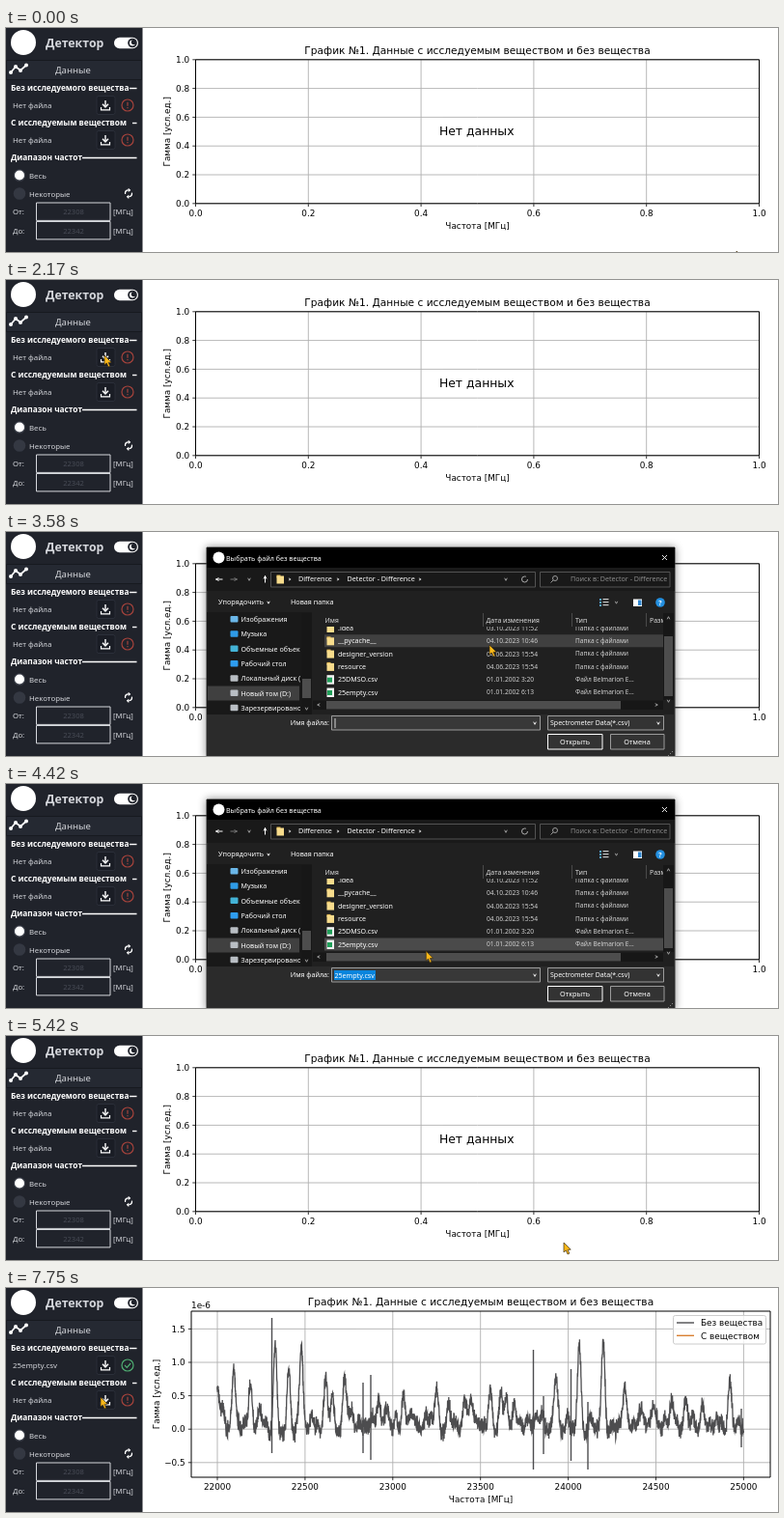
Recreate the animation shown at these times as an HTML page with a canvas. Size 800 px wide and 232 px high, loop 8000 ms.

```html
<!DOCTYPE html>
<html lang="ru">
<head>
<meta charset="utf-8">
<title>Детектор</title>
<style>
html, body { margin: 0; width: 100%; height: 100%; overflow: hidden; background: #fff; }
canvas { display: block; width: 800px; height: 232px; }
</style>
</head>
<body>
<canvas id="stage"></canvas>
<script>
const LOOP = 8000, FRAME = 1000 / 12;
const ratio = window.devicePixelRatio || 1;
const canvas = document.getElementById('stage');
const layer = document.createElement('canvas');
canvas.width = layer.width = 800 * ratio;
canvas.height = 232 * ratio;
layer.height = 242 * ratio;
const stage = canvas.getContext('2d'), layerContext = layer.getContext('2d');
let ctx = stage; // the context that the drawing helpers use

const PLOT = '"DejaVu Sans", sans-serif';
const UI = '"Noto Sans", "Open Sans", sans-serif';

// y is the vertical middle of the capitals
function text(s, x, y, size, color, { align = 'left', font = UI, weight = 400 } = {}) {
  ctx.font = `${weight} ${size}px ${font}`;
  ctx.textAlign = align;
  ctx.fillStyle = color;
  ctx.fillText(s, x, y + size * 0.365);
}
function box(x, y, w, h, fill, stroke, radius = 0) {
  ctx.beginPath();
  ctx.roundRect(x, y, w, h, radius);
  if (fill) { ctx.fillStyle = fill; ctx.fill(); }
  if (stroke) { ctx.strokeStyle = stroke; ctx.lineWidth = 1; ctx.stroke(); }
}
function line(points, color, width = 1) {
  ctx.beginPath();
  points.forEach(([x, y]) => ctx.lineTo(x, y));
  ctx.strokeStyle = color;
  ctx.lineWidth = width;
  ctx.stroke();
}
function disc(x, y, r, fill, stroke, width = 1) {
  ctx.beginPath();
  ctx.arc(x, y, r, 0, 7);
  if (fill) { ctx.fillStyle = fill; ctx.fill(); }
  if (stroke) { ctx.strokeStyle = stroke; ctx.lineWidth = width; ctx.stroke(); }
}
function clipped(x, y, w, h, draw) {
  ctx.save();
  ctx.beginPath();
  ctx.rect(x, y, w, h);
  ctx.clip();
  draw();
  ctx.restore();
}
function chevron(x, y, dx, dy, color = '#aaa') {
  line([[x - dx - dy, y - dy - dx], [x + dx, y + dy], [x - dx + dy, y - dy + dx]], color, 0.9);
}

// ---------- plot ----------
const emptyAxes = {
  x0: 196.5, x1: 780.5, y0: 32.8, y1: 181.8, labelX: 167, title: 23.5,
  xs: [0, 1, 2, 3, 4, 5].map(i => [196.5 + i * 116.8, (i / 5).toFixed(1)]),
  ys: [0, 1, 2, 3, 4, 5].map(i => [181.8 - i * 29.8, (i / 5).toFixed(1)])
};
const dataAxes = {
  x0: 192, x1: 792, y0: 24, y1: 196, labelX: 155.5, title: 14.2,
  xs: [0, 1, 2, 3, 4, 5, 6].map(i => [219 + i * 90.9, String(22000 + i * 500)]),
  ys: [-1, 0, 1, 2, 3].map(i => [146.2 - i * 34.6, (i / 2).toFixed(1).replace('-', '\u2212')])
};

const peaks = [[219, 103], [225, 120], [236, 79], [253, 101], [264, 130], [279, 70], [293, 96], [306, 59],
  [331, 97], [338, 113], [351, 101], [358, 122], [386, 117], [396, 129], [412, 123], [421, 129],
  [446, 113], [459, 130], [476, 117], [482, 126], [502, 105], [513, 109], [519, 119], [527, 126],
  [570, 94], [594, 57], [619, 64], [641, 102], [660, 127], [671, 121], [690, 116], [705, 127], [722, 131], [750, 104]];
const spikes = [[275.5, 31, 171], [370, 98, 171], [378, 90, 178], [546.5, 64, 188], [557, 112, 172],
  [585.5, 84, 179], [603, 118, 188], [762, 125, 165]];

let seed = 11;
const random = () => (seed = seed * 16807 % 2147483647) / 2147483647;
const minor = Array.from({ length: 70 }, (_, i) => [222 + i * 7.75 + random() * 4, 140 - 14 * random()]);
const spectrum = [];
for (let x = 218.8; x <= 764.5; x += 0.2) {
  let y = 144;
  for (const [px, top] of [...peaks, ...minor]) {
    const u = (x - px) / 1.9;
    if (Math.abs(u) < 12) y -= (144 - top) * (1.12 * Math.exp(-u * u / 2) - 0.16 * Math.exp(-u * u / 14));
  }
  spectrum.push([x, y + (random() + random() - 1) * 11]);
}

function plot(a) {
  const cx = (a.x0 + a.x1) / 2, cy = (a.y0 + a.y1) / 2;
  const opt = align => ({ align, font: PLOT });
  for (const [x, label] of a.xs) {
    line([[x, a.y0], [x, a.y1]], '#b0b0b0', 0.9);
    line([[x, a.y1], [x, a.y1 + 3.2]], '#000', 0.8);
    text(label, x, a.y1 + 9.8, 8.87, '#000', opt('center'));
  }
  for (const [y, label] of a.ys) {
    line([[a.x0, y], [a.x1, y]], '#b0b0b0', 0.9);
    line([[a.x0 - 3.2, y], [a.x0, y]], '#000', 0.8);
    text(label, a.x0 - 6.3, y, 8.87, '#000', opt('right'));
  }
  text('График №1. Данные с исследуемым веществом и без вещества', cx, a.title, 10.64, '#000', opt('center'));
  text('Частота [МГц]', cx, a.y1 + 22.7, 8.87, '#000', opt('center'));
  ctx.save();
  ctx.translate(a.labelX, cy);
  ctx.rotate(-Math.PI / 2);
  text('Гамма [усл.ед.]', 0, 0, 8.87, '#000', opt('center'));
  ctx.restore();

  if (a === emptyAxes) {
    text('Нет данных', cx - 0.8, cy - 0.5, 12.4, '#000', opt('center'));
  } else {
    text('1e-6', a.x0, 18, 8.87, '#000', opt('left'));
    line(spectrum, '#4d4d4f', 1.3);
    spikes.forEach(([x, top, bottom]) => line([[x, top], [x, bottom]], '#4d4d4f', 1.4));
  }
  box(a.x0, a.y0, a.x1 - a.x0, a.y1 - a.y0, null, '#000');
  if (a === dataAxes) {
    box(691.5, 28.5, 96, 29.5, 'rgba(255,255,255,.8)', '#ccc', 2);
    [['Без вещества', '#4d4d4f', 36], ['С веществом', '#d98032', 49.3]].forEach(([s, color, y]) => {
      line([[695, y], [713, y]], color, 1.4);
      text(s, 720, y, 8.87, '#000', opt('left'));
    });
  }
}

// ---------- side panel ----------
function fileRow(y, name, loaded) {
  text(name, 7, y + 0.5, 7.9, '#d5d7dc');
  box(94, y - 9.5, 19, 19, '#1a1d25', '#2b2f39', 2);
  line([[103, y - 5], [103, y + 1.5]], '#fff', 1.4);
  line([[100, y - 1.2], [103, y + 2], [106, y - 1.2]], '#fff', 1.4);
  line([[98.5, y + 2], [98.5, y + 4.8], [107.5, y + 4.8], [107.5, y + 2]], '#fff', 1.2);
  disc(126, y, 6, null, loaded ? '#4fae72' : '#a5433c', 1.2);
  if (loaded) {
    line([[123, y], [125.3, y + 2.3], [129.2, y - 2]], '#4fae72', 1.2);
  } else {
    line([[126, y - 3.2], [126, y + 0.8]], '#a5433c', 1.2);
    line([[126, y + 2], [126, y + 3.2]], '#a5433c', 1.2);
  }
}
function section(y, title, lineX) {
  text(title, 5, y - 0.3, 8.3, '#fff', { weight: 700 });
  line([[lineX, y], [135.5, y]], '#fff', 1.4);
}
function panel(loaded) {
  box(0, 0, 141.5, 232, '#20232b');
  disc(18, 15, 13, '#fff');
  text('Детектор', 41, 16, 12.3, '#d5d7dc', { weight: 700 });
  box(112, 9.8, 25, 11.4, '#fff', null, 5.7);
  disc(131, 15.5, 4.8, '#20232b');
  disc(131, 15.5, 3, '#fff');
  disc(132.4, 14.6, 2.6, '#20232b');

  box(0.5, 33.5, 140, 20, '#252932', '#17191f');
  const trend = [[5, 46], [10, 40], [15, 44], [21, 38.5]];
  line(trend, '#fff', 1.7);
  trend.forEach(([x, y]) => disc(x, y, 2, '#fff'));
  text('Данные', 51, 43.5, 9.5, '#d5d7dc');

  section(62.5, 'Без исследуемого вещества', 128);
  fileRow(80, loaded ? '25empty.csv' : 'Нет файла', loaded);
  section(98.5, 'С исследуемым веществом', 131);
  fileRow(116, 'Нет файла', false);
  section(134.5, 'Диапазон частот', 79);

  disc(14, 152.5, 6.3, '#3a3e48');
  disc(14, 152.5, 5, '#fff');
  text('Весь', 24, 152.7, 7.8, '#d5d7dc');
  disc(14, 171.5, 6.3, '#343842');
  text('Некоторые', 24, 171.7, 7.8, '#d5d7dc');
  [0, Math.PI].forEach(turn => {
    ctx.save();
    ctx.translate(127, 171.3);
    ctx.rotate(turn);
    ctx.beginPath();
    ctx.arc(0, 0, 3.5, -0.2, 2);
    ctx.strokeStyle = '#fff';
    ctx.lineWidth = 1.2;
    ctx.stroke();
    line([[0.3, 2], [-1.4, 3.4], [0.3, 5]], '#fff', 1.1);
    ctx.restore();
  });
  [['От:', '22308', 190.3], ['До:', '22342', 209.8]].forEach(([label, value, y]) => {
    text(label, 7, y, 7.8, '#d5d7dc');
    box(31.5, y - 9.3, 76.5, 18.4, '#20232b', '#d5d7dc');
    text(value, 70, y + 0.3, 7.6, '#484c56', { align: 'center' });
    text('[МГц]', 111, y, 7.8, '#d5d7dc');
  });
}

// ---------- file dialog ----------
function titleBar(closing) {
  const title = 'Выбрать файл без вещества';
  if (closing) {
    text(title, 210, 27, 7.1, '#fff');
    return;
  }
  box(208, 16, 485, 21, '#000');
  disc(220.5, 26.5, 6, '#fff');
  text(title, 228, 27, 7.1, '#fff');
  line([[680, 24], [685, 29]], '#fff', 0.9);
  line([[685, 24], [680, 29]], '#fff', 0.9);
}
function horizontalBar() {
  box(318, 174.5, 363, 9.5, '#171717');
  box(332, 175, 305, 8.5, '#4d4d4d');
  chevron(324, 179, -1.3, 0);
  chevron(674, 179, 1.3, 0);
}
function page(x, y) {
  box(x - 3.5, y - 4.5, 7.5, 9.5, '#f2f2f2');
}
function blankDialog() {
  box(208, 16, 485, 217.5, '#fff');
  titleBar();
  box(208, 83, 109, 101, '#191919');
  text('Быстрый доступ', 238, 101, 7.1, '#fff');
  clipped(208, 83, 100, 100.5, () => {
    ['Этот компьютер', '1)download', 'Рабочий стол', 'Локальный диск', 'university'].forEach((s, i) => {
      const y = 116.5 + i * 15.3;
      page(235, y);
      clipped(243, 84, 53, 100, () => text(s, 243.5, y, 7.1, '#fff'));
      line([[298.5, y + 3], [303.5, y - 2]], '#aaa', 1.2);
      line([[299.5, y - 1], [302.5, y + 2]], '#aaa', 1);
    });
  });
  box(306.5, 94, 10, 25, '#4d4d4d');
  chevron(311.5, 89, 0, -1.3);
  box(681, 83, 12, 90, '#171717');
  box(682, 94, 9, 50, '#4d4d4d');
  chevron(686.5, 89, 0, -1.3);
  chevron(686.5, 168, 0, 1.3);
  horizontalBar();
  box(208, 184, 485, 49.5, '#434343');
  [[293, 193, 41, 9], [337, 190, 216, 15], [561, 190, 120, 15], [561, 209, 56, 16], [625, 209, 56, 16]]
    .forEach(r => box(...r, '#fff'));
}

const places = [['Изображения', '#6bb7e8'], ['Музыка', '#2f9be6'], ['Объемные объекты', '#43b3d6'],
  ['Рабочий стол', '#2e9df0'], ['Локальный диск (C:)', '#b9bec4'], ['Новый том (D:)', '#b9bec4'],
  ['Зарезервировано', '#b9bec4']];
const FOLDER = 'Папка с файлами', SHEET = 'Файл Belmarion E...';
const files = [['.idea', '03.10.2023 11:52', FOLDER], ['__pycache__', '04.10.2023 10:46', FOLDER],
  ['designer_version', '04.06.2023 15:54', FOLDER], ['resource', '04.06.2023 15:54', FOLDER],
  ['25DMSO.csv', '01.01.2002 3:20', SHEET], ['25empty.csv', '01.01.2002 6:13', SHEET]];

function folder(x, y) {
  box(x - 3.5, y - 4.5, 4, 3, '#e0b650');
  box(x - 3.5, y - 3.5, 7.5, 8, '#f7dc8c');
}
function addressRow() {
  box(208, 37, 485, 24, '#191919');
  [[221, -1, 0, '#fff'], [236, 1, 0, '#777'], [268.5, 0, -1, '#fff']].forEach(([x, dx, dy, color]) => {
    line([[x - dx * 3.5, 49 - dy * 3.5], [x + dx * 3.5, 49 + dy * 3.5]], color);
    chevron(x + dx * 2, 49 + dy * 2, dx * 1.5, dy * 1.5, color);
  });
  chevron(252, 49, 0, 1.3);
  box(274.5, 41.5, 274, 15.5, '#191919', '#535353');
  folder(284, 49);
  [294, 344, 429].forEach(x => chevron(x, 49, 1.1, 0, '#ddd'));
  text('Difference', 303, 48.5, 7.2, '#fff');
  text('Detector - Difference', 353.5, 48.5, 7.2, '#fff');
  chevron(518, 49, 0, 1.3);
  ctx.beginPath();
  ctx.arc(537.5, 49, 3, 0, 5.2);
  ctx.strokeStyle = '#bbb';
  ctx.stroke();
  box(553.5, 41.5, 134.5, 15.5, '#191919', '#535353');
  disc(569, 48, 2.5, null, '#999');
  line([[567, 50], [564.5, 52.5]], '#999');
  clipped(554, 42, 133, 15, () => text('Поиск в: Detector - Difference', 585, 48.5, 7.1, '#8c8c8c'));
}
function toolbar() {
  text('Упорядочить', 220, 72.7, 7.2, '#fff');
  chevron(272, 73, 0, 1.2, '#fff');
  text('Новая папка', 295, 72.7, 7.2, '#fff');
  for (let i = 0; i < 3; i++) {
    box(615, 69 + i * 3, 2, 2, '#58a6dc');
    box(618.5, 69 + i * 3, 6, 1.2, '#ccc');
  }
  chevron(632.5, 73, 0, 1.2);
  box(650, 69.5, 9, 7.5, '#fff');
  box(655, 70.5, 3.5, 5.5, '#2f86cf');
  disc(678, 73, 4.8, '#2490e0');
  text('?', 678, 73, 7, '#fff', { align: 'center', weight: 700 });
}
function navigation() {
  box(208, 83, 109, 106, '#191919');
  clipped(208, 83, 97, 106, () => places.forEach(([name, color], i) => {
    const y = 90.5 + i * 15.3;
    if (i === 5) box(209, y - 7.5, 95, 15, '#404040');
    box(232.5, y - 3.5, 8, 6.5, color, null, 1);
    text(name, 243.5, y, 7.1, '#fff');
  }));
  box(306.5, 84, 10, 105, '#171717');
  box(307, 152, 9, 20, '#4d4d4d');
  chevron(311.5, 183, 0, 1.3);
}
function fileList(scroll, hovered, selected) {
  clipped(318, 98, 363, 76, () => files.forEach(([name, date, type], i) => {
    const y = 99.5 + i * 13.3 + 7 * (1 - scroll);
    if (i === selected || i === hovered) box(330, y - 6.5, 351, 13, i === selected ? '#4a4a4a' : '#404040');
    if (type === FOLDER) {
      folder(336, y);
    } else {
      page(336, y);
      box(333, y - 2, 5, 5, '#21a05a');
    }
    text(name, 344, y, 7.1, '#fff');
    text(date, 498, y, 6.7, '#d0d0d0');
    text(type, 590, y, 6.5, '#d0d0d0');
  }));
  clipped(318, 84, 363, 14, () => {
    [['Имя', 330.5], ['Дата изменения', 497.5], ['Тип', 590], ['Размер', 667]]
      .forEach(([s, x]) => text(s, x, 91, 6.9, '#ddd'));
    [494.5, 586.5, 663.5].forEach(x => line([[x, 84], [x, 98]], '#4a4a4a'));
  });
  box(681, 84, 11, 90, '#171717');
  box(682, 100 + 8 * scroll, 9, 62, '#4d4d4d');
  chevron(686.5, 89, 0, -1.3);
  chevron(686.5, 175, 0, 1.3);
  horizontalBar();
}
function fileDialog(k, [mx, my]) {
  const picked = k >= 50;
  box(208, 16, 485, 217.5, '#202020', '#3a3a3a');
  titleBar(k > 60);
  addressRow();
  toolbar();
  navigation();
  const inList = mx > 330 && mx < 681 && my > 98 && my < 173;
  fileList(k >= 41 ? 1 : 0, inList ? Math.round((my - 101) / 13.3) : -1, picked ? 5 : -1);

  box(208, 189, 485, 44.5, '#2b2b2b');
  text('Имя файла:', 335, 197.7, 7.1, '#fff', { align: 'right' });
  box(337.5, 190.5, 216, 14.5, '#383838', '#9b9b9b');
  if (picked) {
    box(340, 193, 43, 10, '#0a84dc');
    text('25empty.csv', 340.5, 198, 7.1, '#fff');
  } else {
    line([[341, 193], [341, 203]], '#fff', 0.8);
  }
  chevron(548, 198, 0, 1.3, '#fff');
  box(561.5, 190.5, 120, 14.5, '#333', '#9b9b9b');
  text('Spectrometer Data(*.csv)', 564, 197.7, 7, '#fff');
  chevron(676, 198, 0, 1.3, '#fff');
  const overOpen = mx > 561 && mx < 618 && my > 209;
  box(561.5, 209.5, 56.5, 15.5, overOpen ? '#666' : '#333', '#fff');
  text('Открыть', 589.5, 217, 7.3, '#fff', { align: 'center' });
  box(626.5, 209.5, 55.5, 15.5, '#333', '#9b9b9b');
  text('Отмена', 654, 217, 7.3, '#fff', { align: 'center' });
  for (let i = 0; i < 3; i++) box(690 - i * 2, 227 + i * 2, 1, 1, '#888');
}

// opacity and scale while the window opens and closes
const transitions = { 32: [0.55, 0.975], 33: [0.94, 0.994], 61: [0.52, 0.975], 62: [0.12, 0.95] };
function dialog(k, cursor) {
  if (k < 32 || k > 62) return;
  const [alpha, scale] = transitions[k] || [1, 1];

  // compose the window as one layer so that it fades evenly
  ctx = layerContext;
  ctx.setTransform(ratio, 0, 0, ratio, 0, 0);
  ctx.clearRect(0, 0, 800, 242);
  if (k < 35) blankDialog(); else fileDialog(k, cursor);
  ctx = stage;

  ctx.save();
  ctx.globalAlpha = alpha;
  ctx.translate(450.5, 125);
  ctx.scale(scale, scale);
  ctx.translate(-450.5, -125);
  if (alpha > 0.9) {
    ctx.shadowColor = 'rgba(0,0,0,.45)';
    ctx.shadowBlur = 8 * ratio;
  }
  ctx.drawImage(layer, 0, 0, 800, 242);
  ctx.restore();
}

// ---------- pointer: [step, x, y] ----------
const path = [[0, 757, 231], [10, 130, 92], [15, 102, 78], [30, 102, 78], [33, 119, 81], [39, 470, 128],
  [43, 501, 117], [49, 400, 163], [51, 400, 163], [58, 578, 214], [75, 578, 214], [81, 117, 112],
  [84, 117, 112], [89, 98, 113], [96, 98, 113]];
function pointerAt(k) {
  const i = path.findIndex(p => p[0] > k);
  const [k0, x0, y0] = path[i - 1], [k1, x1, y1] = path[i];
  const u = (k - k0) / (k1 - k0), e = u * u * (3 - 2 * u);
  return [x0 + (x1 - x0) * e, y0 + (y1 - y0) * e];
}
function pointer([x, y]) {
  ctx.save();
  ctx.translate(x, y);
  ctx.beginPath();
  [[0, 0], [0, 10], [2.3, 8], [4, 12], [5.8, 11.2], [4.2, 7.4], [7.2, 7.2]].forEach(p => ctx.lineTo(...p));
  ctx.closePath();
  ctx.fillStyle = '#fbb819';
  ctx.fill();
  ctx.strokeStyle = '#3a2c10';
  ctx.lineWidth = 0.7;
  ctx.stroke();
  ctx.restore();
}

const start = performance.now();
function render(now) {
  const time = Math.max(0, now - start) % LOOP;
  const k = Math.floor((time + 5) / FRAME) % 96;
  const cursor = pointerAt(k);
  const loaded = k >= 83;
  ctx.setTransform(ratio, 0, 0, ratio, 0, 0);
  box(0, 0, 800, 232, '#fff');
  plot(loaded ? dataAxes : emptyAxes);
  panel(loaded);
  dialog(k, cursor);
  pointer(cursor);
  requestAnimationFrame(render);
}
requestAnimationFrame(render);
</script>
</body>
</html>
```
